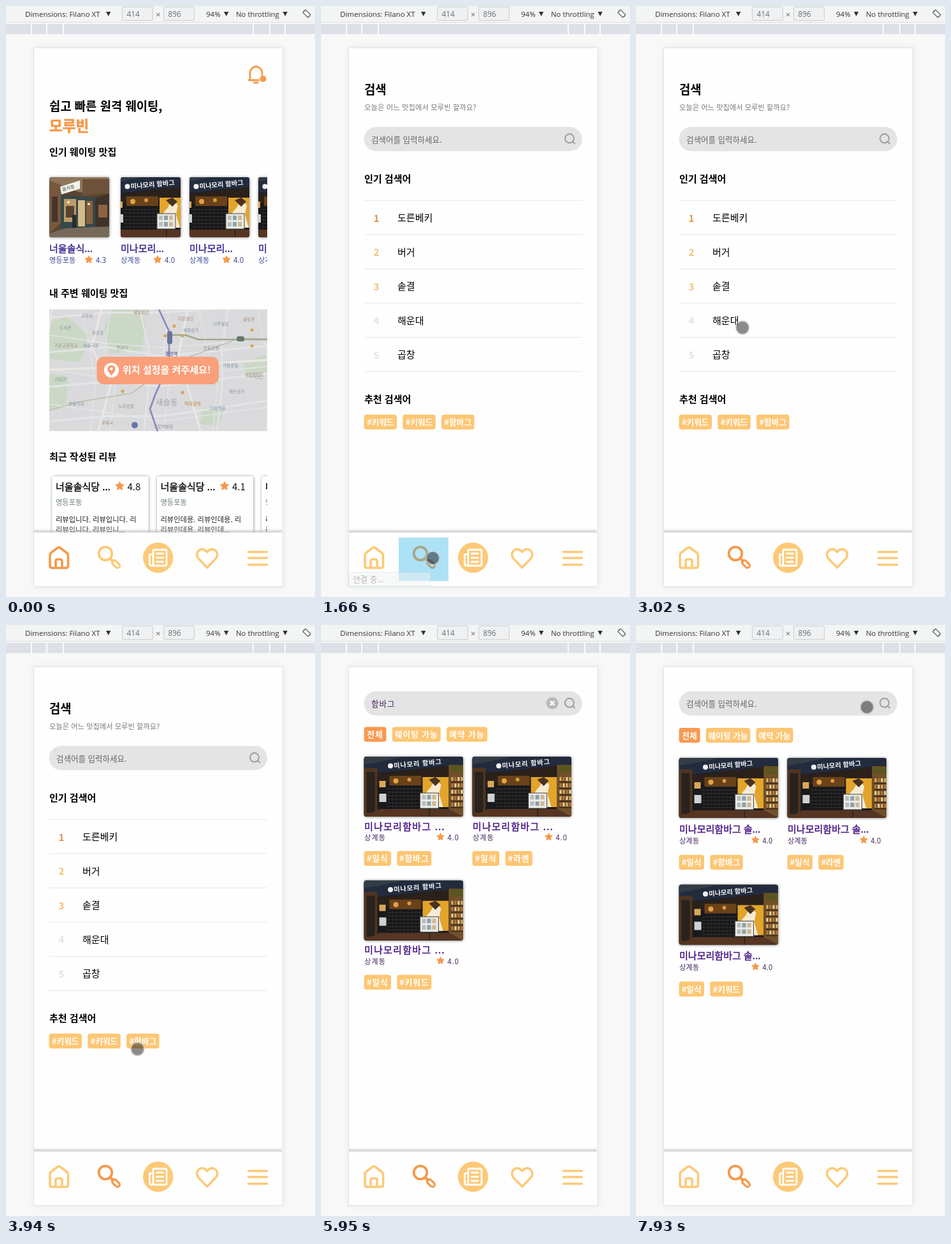
Animation, 485 px wide and 925 px high, one loop 8000 ms. Source, as an HTML page:

```html
<!DOCTYPE html>
<html lang="ko">
<head>
<meta charset="utf-8">
<style>
html, body { margin: 0; width: 100%; height: 100%; overflow: hidden; background: #f8f8f8; }
#stage { display: block; }
text { font-family: "Noto Sans CJK KR", "Noto Sans KR", sans-serif; white-space: pre; }
.bar text { font-family: "Open Sans", "Noto Sans", sans-serif; }
.wide text { letter-spacing: .08em; }
.line { fill: none; stroke-linecap: round; stroke-linejoin: round; }
</style>
</head>
<body>
<svg id="stage" width="485" height="925" viewBox="0 0 485 925"></svg>
<script>
const LOOP = 8000;
const HOT = '#f5994a', SOFT = '#fcc978', LINK = '#3a2591', SEEN = '#461683';
const BRAND = '모루빈', DINER = '너울솔식당', GRILL = '미나모리함바그';

const text = (x, y, s, size, fill = '#111', weight = 400, more = '') =>
  `<text x="${x}" y="${y}" font-size="${size}" fill="${fill}" font-weight="${weight}" ${more}>${s}</text>`;
const title = (x, y, s, size = 15.04) => text(x, y, s, size, '#000', 700);
// Medium weight: regular glyphs thickened by a hairline
const name = (x, y, s, fill) => text(x, y, s, 15.04, fill, 400, `stroke="${fill}" stroke-width=".45"`);
const rect = (x, y, w, h, fill, r = 0, more = '') =>
  `<rect x="${x}" y="${y}" width="${w}" height="${h}" rx="${r}" fill="${fill}" ${more}/>`;
const dot = (x, y, r, fill, more = '') => `<circle cx="${x}" cy="${y}" r="${r}" fill="${fill}" ${more}/>`;
const line = (d, color, w, more = '') => `<path class="line" d="${d}" stroke="${color}" stroke-width="${w}" ${more}/>`;
const shape = (d, fill) => `<path d="${d}" fill="${fill}"/>`;
const group = (id, body, more = '') => `<g id="${id}" ${more}>${body}</g>`;
const clip = (id, ...box) => `<clipPath id="${id}">${rect(...box)}</clipPath>`;
const times = (n, f) => Array.from({ length: n }, (_, i) => f(i)).join('');

function star(x, y, r) {
  const pts = Array.from({ length: 10 }, (_, i) => {
    const a = i * Math.PI / 5 - Math.PI / 2, q = i % 2 ? r * .5 : r;
    return (x + q * Math.cos(a)).toFixed(1) + ',' + (y + q * Math.sin(a)).toFixed(1);
  });
  return `<polygon points="${pts.join(' ')}" fill="${HOT}" stroke="${HOT}" stroke-linejoin="round"/>`;
}

// Browser toolbar and page frame
function chrome() {
  const tri = x => shape(`M${x} 9h7.4l-3.7 7z`, '#333');
  const box = (x, s) => rect(x, 1.5, 48, 21, '#eff0f1', 1, 'stroke="#cbcdd0"') + text(x + 7, 17, s, 11.8, '#6b6f74');
  return rect(0, 0, 485, 925, '#f8f8f8') + rect(0, 0, 485, 25.5, '#f3f4f4') + rect(0, 25, 485, 1, '#dcdddf') +
    rect(0, 28, 485, 16, '#dde0e6') +
    [40, 64, 90, 388, 414, 438].map(x => rect(x - 1, 27, 2, 17, '#fbfbfb')).join('') +
    group('bar', text(30, 17, 'Dimensions: Filano XT', 11.5, '#333') + tri(157) + box(182.5, '414') +
      text(235, 18, '×', 13, '#666') + box(247.5, '896') + text(314, 17, '94%', 11.5, '#333') + tri(342) +
      text(361, 17, 'No throttling', 11.4, '#333') + tri(434.5) +
      `<g transform="rotate(-45 472 12)">${rect(469, 6.5, 6, 11, 'none', 1, 'stroke="#6d716d" stroke-width="1.3"')}</g>` +
      line('M466 11a6 6 0 0 1 5-5M478 13a6 6 0 0 1-5 5', '#6d716d', 1.1), 'class="bar"') +
    rect(43.5, 65.5, 391, 843, '#fefefe', 0, 'stroke="#dee3e3" filter="url(#halo)"');
}

// Bottom navigation
function nav(active) {
  const tint = i => i === active ? HOT : SOFT;
  return rect(44, 818, 389, 6, 'url(#lift)') + rect(44, 824, 390, 84, '#fefefe') +
    line('M69 860q0-3 2-4.500l10-7.500q2-1.500 4 0l10 7.500q2.500 2 2.500 4.500v16q0 3.500-3.500 3.500h-21.500q-3.500 0-3.500-3.500zM78 879v-10q0-3 3-3h4q3 0 3 3v10', tint(0), 3.6) +
    dot(156, 857, 10.3, 'none', `stroke="${tint(1)}" stroke-width="3.8"`) + line('M164 865l4 4', tint(1), 4) +
    `<g transform="rotate(45 172.500 873.500)">${rect(165.5, 870, 14, 7, 'none', 3.5, `stroke="${tint(1)}" stroke-width="3.2"`)}</g>` +
    dot(238.7, 863.5, 23.7, SOFT) +
    line('M231 874V852.500q0-1.500 1.500-1.500h18q1.500 0 1.500 1.500v21q0 2.500-2.500 2.500h-21q-3 0-3-3v-14.500h5M236.500 857h10M236.500 863.500h10M236.500 870h10', '#fff', 2.8) +
    line('M315.700 879l-14-14.500q-4-6 0-11.500 6.500-6 13 .5l1 1 1-1q6.500-6.500 13-.5 4 5.500 0 11.500z', SOFT, 3.5) +
    line('M380.500 854.500h29M380.500 864h29M380.500 874.500h29', SOFT, 3.5);
}

// Photos as flat shapes
const grillPhoto = rect(0, 0, 156, 94, '#191a1e') + shape('M0 0h156v12L22 26 0 20z', '#222c3e') +
  shape('M0 0h62L20 9 0 12z', '#343c46') + shape('M22 27L136 14v20L22 42z', '#2b211a') +
  rect(0, 18, 21, 76, '#50351f') + rect(4, 24, 13, 64, '#28231f') + rect(24, 38, 10, 10, '#d8a757') +
  rect(24, 58, 11, 13, '#cdd2cf') + rect(40, 30, 50, 15, '#6a421a') + dot(50, 38, 4, '#e4a244') + dot(71, 36, 3, '#d99a3e') +
  rect(36, 47, 56, 35, '#17171a') +
  times(6, i => rect(36, 50 + i * 5.5, 56, .7, '#44403c')) + times(9, i => rect(39 + i * 6, 47, .5, 35, '#34312f')) +
  rect(92, 32, 41, 47, '#e2a42b') + shape('M97 79q-5-20 7-30l8-14 9 9-3 14 6 21z', '#f5ead2') + shape('M102 36l10-4 8 6-8 8z', '#493222') +
  rect(133, 13, 23, 81, '#71502a') + rect(136, 14, 20, 11, '#5b5520') +
  times(5, i => rect(136, 39 + i * 10, 20, 1.5, '#3c2816') + times(4, j => rect(137 + j * 5, 32 + i * 10, 3, 6, ['#d8b165', '#b8763a', '#e7d7a1'][(i + j) % 3]))) +
  shape('M0 94l24-12h110l22 12z', '#563522') + rect(88, 57, 29, 24, '#e9ebe8', 0, 'stroke="#444"') +
  times(6, i => rect(91 + i % 3 * 8, 60 + (i > 2) * 10, 6, 7, ['#b8bdba', '#8da0aa', '#d0b890'][i % 3])) + rect(102, 82, 1.5, 12, '#222') +
  dot(41.5, 14.5, 4, '#f1f2f2') + text(47, 18, '미나모리 함바그', 10.3, '#fafafa', 700, 'transform="rotate(-5 47 18)"');

const dinerPhoto = rect(0, 0, 94, 94, '#594431') + shape('M0 0h94v16L50 24 0 9z', '#8d765b') +
  shape('M0 5l18 7v60L0 88z', '#77583d') + shape('M52 3h42v22l-42 4z', '#6d5138') +
  shape('M17 15l31-10v13L19 27z', '#f2f2e9') + text(21, 22, '음식점', 7, '#6c7b71', 700, 'transform="rotate(-16 21 22)"') +
  shape('M18 28l54 4v49l-54 5z', '#35494a') + rect(23, 34, 19, 36, '#bd9a68') + rect(45, 36, 11, 41, '#d6ba89') + rect(58, 37, 10, 36, '#87613b') +
  rect(26, 45, 13, 18, '#574332') + shape('M72 32l22-6v55l-22 2z', '#3e332a') + rect(77, 43, 14, 20, '#8f6340') +
  dot(30, 39, 2, '#fff0bd') + dot(62, 42, 2, '#ffe8ae') + rect(36, 59, 6, 20, '#252d30') + shape('M0 88l24-8 70-3v17H0z', '#77695a') +
  rect(4, 30, 9, 40, '#45352a');

const photo = (x, y, w, art, dx = 0) =>
  rect(x, y, w, 94, '#333', 4, 'filter="url(#drop)"') +
  `<g transform="translate(${x} ${y})" clip-path="url(#${w < 100 ? 'square' : 'broad'})"><g transform="translate(${dx} 0)">${art}</g></g>`;

function map() {
  const labels = [
    [118, 487, '공원길'], [200, 482, '새빛회관'], [135, 514, '중앙동'], [84, 506, '도서관'], [76, 534, '가온고등학교'],
    [121, 534, '새솔극장'], [173, 537, '옛궁터'], [270, 492, '다온빌딩'], [278, 510, '새빛상가'], [310, 538, '한들은행'], [372, 493, '솔빛관'],
    [325, 500, '나루빌딩'], [350, 606, '해든상가'], [176, 629, '누리호텔'], [76, 587, '기념관'], [98, 625, '한들타워'],
    [150, 655, '우체국'], [320, 632, '다솜병원'], [232, 661, '가온백화점'], [375, 580, '새솔빌딩'], [340, 565, '가람호텔']
  ];
  const streets = rect(68, 475, 342, 190.5, '#dadadc') +
    shape('M165 475h47l8 26-8 38-48 5-10-39zM68 494l28-8 34 30-14 42-48-6zM68 575l30 5-3 42-27 12zM310 628l32 4-8 26-30-4zM372 558l38-14v30l-32 8z', '#cbd8c5') +
    times(8, i => line(`M${72 + i * 46} 475l${i % 2 ? 14 : -9} 62 ${i % 3 * 8} 60-8 70`, '#e4e5e6', i % 3 ? 1.4 : 2.5)) +
    times(7, i => line(`M68 ${488 + i * 27}l90 ${i % 2 ? 13 : -8} 85 ${i % 3 * 7} 167-${12 + i * 2}`, '#e4e5e6', i % 2 ? 1.6 : 2.8)) +
    line('M68 569l92-3 96-2 154-10M150 475l-16 60 31 55-20 75M285 475l-14 70 34 120', '#e9e7e3', 3.5) +
    line('M68 633l44-13 85-14 67-48 103-38 43 1', '#bdbeac', 1.6) +
    line('M240 475l16 34v50l-22 50-8 22 12 35', '#8888c0', 2.6) +
    line('M262 515h20l20 7h108', '#a0aa92', 2.6) +
    [[250, 516], [264, 501], [277, 516], [386, 507], [386, 532], [368, 521], [277, 605], [183, 603]].map(p => dot(...p, 2.6, '#d8a35b')).join('') +
    rect(253, 509, 8, 20, '#6a739a', 3) + rect(362, 517, 12, 8, '#637965', 3) + dot(202, 656, 5, '#6676a9');
  return `<g clip-path="url(#area)">${streets}</g>` +
    labels.map(([x, y, s], i) => text(x, y, s, 6.6, ['#89929d', '#a18b78', '#7990a5'][i % 3])).join('') +
    text(235, 625, '새솔동', 12.5, '#a0a3a7') + text(280, 625, '먹자골목', 7, '#c59c70', 700) + text(250, 547, '중앙역', 7, '#6670a0', 700) +
    text(385, 583, '가온', 11, '#a9aaac') +
    rect(142.5, 549, 191.5, 43, '#f99f79', 11) + dot(165.5, 570, 11.6, '#fff') +
    shape('M165.500 578.500l-5-6.500a6.200 6.200 0 1 1 10 0z', '#f7976d') + dot(165.5, 568, 2.4, '#fff') +
    text(183, 575, '위치 설정을 켜주세요!', 15.04, '#fff', 700);
}

function home() {
  const shop = (x, full, area, score, sx = 58) =>
    (full === DINER ? photo(x, 268, 94, dinerPhoto) : photo(x, 268, 94, grillPhoto, -31)) +
    name(x, 385, full.slice(0, 4) + '...', LINK) + text(x, 402, area, 11.28, '#3d4795') +
    star(x + sx, 397, 6.2) + text(x + sx + 11, 402, score, 11.6, '#3d4795');
  const review = (x, score, s) => rect(x, 736, 151, 120, '#fefefe', 4, 'filter="url(#drop)"') +
    name(x + 5.5, 758, DINER + ' ...', '#111') + star(x + 106, 751.5, 7) + text(x + 118, 758, score, 15.04) +
    text(x + 5.5, 781, '영등포동', 11.28, '#6c7f70') +
    text(x + 5.5, 808, `${s}. ${s}. 리`, 11.28, '#222') +
    text(x + 5.5, 824, `${s}. ${s.slice(0, 4)}...`, 11.28, '#444');
  return line('M383 116v-11a9.500 10 0 0 1 19 0v3M381 116h16M392.500 95v-1M389.500 120h5.500', HOT, 2.8) + dot(403.5, 114, 5, HOT) +
    title(68, 164, '쉽고 빠른 원격 웨이팅,', 18.8) + text(68, 196, BRAND, 22.56, HOT, 900, `stroke="${HOT}" stroke-width=".7"`) +
    title(68, 234, '인기 웨이팅 맛집') + title(68, 455, '내 주변 웨이팅 맛집') + title(68, 711, '최근 작성된 리뷰') +
    `<g clip-path="url(#strip)">${shop(68, DINER, '영등포동', '4.3', 62)}${[180, 288, 396].map(x => shop(x, GRILL, '상계동', '4.0')).join('')}
    ${review(72.5, '4.8', '리뷰입니다')}${review(237, '4.1', '리뷰인데용')}${review(401.5, '4.0', '리뷰입니다')}</g>` + map() + nav(0);
}

const tag = (x, y, w, s, fill = '#fdc674') =>
  rect(x, y, w, 23.3, fill, 4) + text(x + w / 2, y + 16.6, s, 12.7, '#fff', 700, 'text-anchor="middle"');
const field = y => rect(67.5, y, 342.5, 38, '#e4e4e4', 19) +
  dot(390, y + 18, 7, 'none', 'stroke="#a09c9a" stroke-width="2"') + line(`M395 ${y + 23}l3 3`, '#a09c9a', 2);
const hint = y => text(79, y, '검색어를 입력하세요.', 12.53, '#666');

function search() {
  const rows = ['도른베키', '버거', '솥결', '해운대', '곱창'];
  return title(68, 138, '검색', 18.8) + text(68, 163, `오늘은 어느 맛집에서 ${BRAND} 할까요?`, 11.28, '#777', 400, 'id="sub"') +
    field(189.3) + hint(213.5) + title(68, 276, '인기 검색어') +
    times(6, i => rect(68, 303.7 + i * 53.6, 342, 1, '#e5e5e5')) +
    rows.map((s, i) => text(82.5, 337.6 + i * 53.5, i + 1, 15.04, ['#e0934f', '#f6bf72', '#f6bf72', '#e3e3e3', '#e3e3e3'][i], 700) +
      text(120, 337.4 + i * 53.5, s, 15.04, '#000')).join('') +
    title(68, 621, '추천 검색어') +
    ['#키워드', '#키워드', '#함바그'].map((s, i) => tag(67.5 + i * 60.8, 639.5, 51.5, s)).join('') + nav(1);
}

function results(early) {
  const k = early
    ? { tag: 159.5, img: 206, row: 193.7, name: 114.5, area: 131, chip: 147.7, w: [35, 76, 64], two: 42.5, three: 54, end: '' }
    : { tag: 161, img: 208, row: 198.4, name: 117, area: 133.7, chip: 151.7, w: [33, 69.5, 58], two: 39.5, three: 51.5, end: '솔' };
  let x = 67.5;
  const filters = ['전체', '웨이팅 가능', '예약 가능'].map((s, i) => {
    const t = tag(x, k.tag, k.w[i], s, i ? undefined : '#f9994f');
    x += k.w[i] + 9.3;
    return t;
  }).join('');
  const card = (x, y, kind) => photo(x, y, 155.5, grillPhoto) + name(x + .5, y + k.name, `${GRILL} ${k.end}...`, SEEN) +
    text(x + .5, y + k.area, '상계동', 11.28, '#43265f') + star(x + 120, y + k.area - 5.2, 6) + text(x + 131, y + k.area, '4.0', 11.28, '#43265f') +
    tag(x, y + k.chip, k.two, '#일식') + tag(x + k.two + 9.3, y + k.chip, kind.length > 3 ? k.three : k.two, kind);
  return filters + card(67.5, k.img, '#함바그') + card(237.5, k.img, '#라멘') + card(67.5, k.img + k.row, '#키워드');
}

const shadow = (id, d, blur, color) =>
  `<filter id="${id}" x="-20%" y="-20%" width="140%" height="140%"><feDropShadow dx="${d}" dy="${d}" stdDeviation="${blur}" flood-color="${color}"/></filter>`;

document.getElementById('stage').innerHTML =
  `<defs>${shadow('drop', .4, 1.9, '#0007')}${shadow('halo', 0, 4, '#dfe8e8')}
  <linearGradient id="lift" x2="0" y2="1"><stop stop-color="#aaa" stop-opacity="0"/><stop offset="1" stop-color="#aaa" stop-opacity=".6"/></linearGradient>
  ${clip('strip', 67, 250, 343, 574, '#000')}${clip('area', 68, 475, 342, 190.5, '#000')}
  ${clip('square', 0, 0, 94, 94, '#000', 4)}${clip('broad', 0, 0, 155.5, 94, '#000', 4)}</defs>` +
  chrome() + group('home', home()) + group('search', search()) +
  group('results', field(103.8) + nav(1) + group('early', results(true), 'class="wide"') + group('late', results(false)) +
    group('query', text(79, 127.5, '함바그', 12.53, '#40215e') + dot(363, 122.3, 9.5, '#b9b9b9') + line('M360.500 119.800l5 5m0-5l-5 5', '#fff', 2.6), 'class="wide"') +
    group('empty', hint(128))) +
  group('tap', rect(122, 832, 78, 68, '#33b5e5', 0, 'fill-opacity=".4"')) +
  group('status', rect(44, 886.5, 127.5, 21.5, '#f1f2f3', 2, 'stroke="#d8dadc"') + text(50, 902, '연결 중...', 12.6, '#74777a')) +
  group('cursor', group('idle', dot(0, 0, 10.5, '#000', 'fill-opacity=".45" stroke="#ddd" stroke-opacity=".6" stroke-width="2"')) +
    group('press', dot(0, 0, 10.5, '#bdb91e', 'fill-opacity=".85" stroke="#e4de48" stroke-opacity=".8" stroke-width="2"')));

// Motion: [time, value] tables; hard tables hold each value until the next time
function run(id, prop, table, hard = true) {
  const all = [...table, [LOOP, table.at(-1)[1]]];
  document.getElementById(id).animate(
    all.map(([t, v]) => ({ offset: t / LOOP, [prop]: v, easing: hard ? 'step-end' : 'linear' })),
    { duration: LOOP, iterations: Infinity }).startTime = 0;
}
const fade = (id, ...table) => run(id, 'opacity', [[0, 0], ...table]);

run('home', 'opacity', [[0, 1], [1660, 0]]);
fade('search', [1660, 1], [5600, 0]);
fade('results', [5600, 1]);
run('early', 'opacity', [[0, 1], [5990, 0]]);
fade('late', [5990, 1]);
run('query', 'opacity', [[0, 1], [7540, 0]]);
fade('empty', [7540, 1]);
run('sub', 'letterSpacing', [[0, '.12px'], [1720, '0px']]);
fade('tap', [1660, 1], [1720, .5], [1830, 0]);
fade('status', [1420, 1], [1660, .5], [1720, 0]);
fade('cursor', [200, 1], [5600, 0], [6290, 1]);
fade('press', [1050, 1], [1250, 0], [7430, 1], [7540, 0]);
run('idle', 'opacity', [[0, 1], [1050, 0], [1250, 1], [7430, 0], [7540, 1]]);

const path = [
  [0, 200, 926], [200, 200, 920], [330, 196, 899], [530, 183, 872], [730, 175.5, 864], [2080, 175.5, 864],
  [2140, 174, 850], [2320, 163, 735], [2500, 146, 565], [2640, 135, 440], [2740, 134, 418], [2860, 147, 440],
  [2940, 161, 473], [3020, 167, 503], [3200, 183, 562], [3450, 202, 638], [3640, 206, 663], [3730, 206.5, 665],
  [3930, 206.5, 665], [4010, 206, 655], [4370, 206, 655], [4390, 207, 661], [4440, 207, 656], [5420, 207, 656],
  [5430, 209, 656], [5600, 209, 656], [6280, 470, 278], [6290, 469, 276], [6480, 430, 210], [6680, 380, 142],
  [6870, 361, 118], [7020, 361, 118], [7180, 360, 128], [7755, 360, 128], [7760, 361, 128.5], [7929, 361, 128.5], [7930, 362.5, 128.5]
];
run('cursor', 'transform', path.map(([t, x, y]) => [t, `translate(${x}px, ${y}px)`]), false);
</script>
</body>
</html>
```
